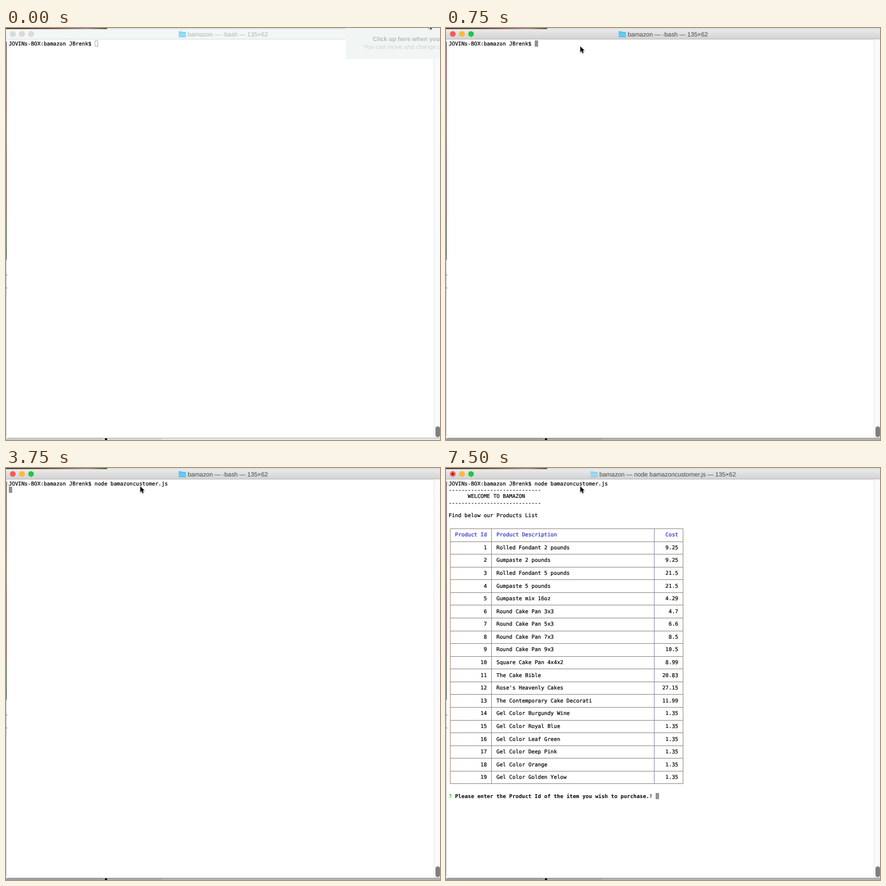
An HTML page with a canvas that plays this animation: 768x729 px, repeating every 8000 ms.

```html
<!DOCTYPE html>
<html lang="en">
<head>
<meta charset="utf-8">
<title>Terminal</title>
<style>
  html, body { margin: 0; width: 100%; height: 100%; overflow: hidden; background: #fff; }
  canvas { display: block; }
</style>
</head>
<body>
<canvas id="stage" width="768" height="729"></canvas>
<script>
const ctx = document.getElementById("stage").getContext("2d");
const W = 768, H = 729, LOOP = 8000;
const COL = 5.642, ROW = 11.29, LEFT = 4.7, BASE = 30.9;
const MONO = '9.37px "DejaVu Sans Mono", monospace';
const SANS = '10.85px "Liberation Sans", Arial, sans-serif';
const PROMPT = "JOVINs-BOX:bamazon JBrenk$ ";
const COMMAND = "node bamazoncustomer.js";

const PRODUCTS = [
  ["Rolled Fondant 2 pounds", "9.25"],
  ["Gumpaste 2 pounds", "9.25"],
  ["Rolled Fondant 5 pounds", "21.5"],
  ["Gumpaste 5 pounds", "21.5"],
  ["Gumpaste mix 16oz", "4.29"],
  ["Round Cake Pan 3x3", "4.7"],
  ["Round Cake Pan 5x3", "6.6"],
  ["Round Cake Pan 7x3", "8.5"],
  ["Round Cake Pan 9x3", "10.5"],
  ["Square Cake Pan 4x4x2", "8.99"],
  ["The Cake Bible", "20.83"],
  ["Rose's Heavenly Cakes", "27.15"],
  ["The Contemporary Cake Decorati", "11.99"],
  ...["Burgundy Wine", "Royal Blue", "Leaf Green", "Deep Pink", "Orange", "Golden Yelow"]
    .map(name => ["Gel Color " + name, "1.35"])
];

function rect(x, y, w, h, color) {
  ctx.fillStyle = color;
  ctx.fillRect(x, y, w, h);
}

function label(text, x, y, font, color) {
  ctx.font = font;
  ctx.fillStyle = color;
  ctx.fillText(text, x, y);
}

// Text on the terminal's character grid, with a hairline for weight
function print(text, col, row, color = "#000", bold = false) {
  const x = LEFT + col * COL, y = BASE + row * ROW;
  label(text, x, y, (bold ? "bold " : "") + MONO, color);
  if (bold) return;
  ctx.lineWidth = 0.22;
  ctx.strokeStyle = color;
  ctx.strokeText(text, x, y);
}

function printRight(text, endCol, row, color) {
  print(text, endCol - text.length, row, color);
}

function vertical(stops, h) {
  const g = ctx.createLinearGradient(0, 0, 0, h);
  stops.forEach(([at, color]) => g.addColorStop(at, color));
  return g;
}

function drawDesktop(active) {
  rect(0, 0, W, H, "#fff");
  const top = ctx.createLinearGradient(0, 0, 179, 0);
  ["#59382c", "#4c4a2a", "#6b4a3a", "#8a6a60", "#a98791", "#4b5a2c"]
    .forEach((c, i) => top.addColorStop(i / 5, c));
  rect(0, 0, 179, 2, top);
  rect(179, 0, W - 179, 2, "#dedede");
  rect(0, 726, 172, 3, "#e2e2e2");
  rect(172, 726, 103, 3, "#efefef");
  rect(0, 726, W, 3, active ? "rgba(0,0,0,.3)" : "rgba(0,0,0,.1)");
  rect(175, 726, 4, 3, "#111");
}

function drawFolder(x, color) {
  ctx.fillStyle = color;
  ctx.beginPath();
  ctx.roundRect(x, 5.5, 6, 4, 1);
  ctx.roundRect(x, 6.7, 13, 9.6, 1);
  ctx.fill();
  rect(x + 0.5, 8, 12, 0.8, "rgba(40,130,180,.28)");
  rect(x + 0.5, 15.4, 12, 0.8, "rgba(40,130,180,.35)");
}

function drawLights(active, running) {
  const colors = active ? ["#fc5650", "#fdbb37", "#1fc843"] : ["#d9dada", "#d9dada", "#d9dada"];
  colors.forEach((color, i) => {
    ctx.beginPath();
    ctx.arc(12 + 16.2 * i, 10.6, 4.9, 0, 7);
    ctx.fillStyle = color;
    ctx.fill();
    ctx.lineWidth = 0.5;
    ctx.strokeStyle = "rgba(0,0,0,.1)";
    ctx.stroke();
  });
  if (running) {
    ctx.beginPath();
    ctx.arc(12, 10.6, 1.7, 0, 7);
    ctx.fillStyle = "#5c0a08";
    ctx.fill();
  }
}

function drawWindow(active, running) {
  ctx.save();
  ctx.beginPath();
  ctx.roundRect(0, 2, W + 8, 724, 4);
  ctx.clip();
  rect(0, 2, W, 724, "#fff");
  rect(0, 2, W, 18, active ? vertical([[0, "#ededed"], [1, "#d2d2d2"]], 20) : "#f2f6f6");
  rect(0, 19.4, W, 0.9, active ? "#b4b4b4" : "#d8dbdb");
  rect(757, 20, 11, 705, active ? "#fafafa" : "#f9fbfb");
  rect(757, 20, 1, 705, active ? "#e2e2e2" : "#dfe5e5");
  rect(0, 725, W, 1, active ? "#a0a0a0" : "#b4b4b4");
  ctx.restore();

  rect(0, 24, 1, 386, vertical([
    [0, "#3a2c25"], [0.15, "#5a231f"], [0.35, "#5b2b20"], [0.46, "#504c28"],
    [0.54, "#532422"], [0.8, "#562423"], [0.87, "#284023"], [1, "#223822"]
  ], 410));
  rect(0, 410, 1, 312, "#c4c4c4");
  rect(0, 436, 1, 2, "#222");
  rect(0, 459, 1, 2, "#222");

  ctx.beginPath();
  ctx.roundRect(760, 705, 8, 19, 4);
  ctx.fillStyle = "#7f7f7f";
  ctx.fill();

  drawLights(active, running);
  drawFolder(running ? 255.5 : 305.5, running ? "#a2d8ee" : active ? "#62caf4" : "#94dcfa");
  label(`bamazon — ${running ? COMMAND : "-bash"} — 135×62`, running ? 271.5 : 321.5, 14.5,
    SANS, active ? "#474747" : "#b2b4b4");
}

function drawNotice() {
  rect(601, 0, 167, 55, "#f1f6f5");
  label("Click up here when you", 649, 22.5, "bold " + SANS.replace("10.85", "10.65"), "#b6b9b8");
  label("You can move and change t", 633, 36.5, SANS, "#cfd2d1");
}

function drawCaret(col, row, active) {
  const x = Math.round(LEFT + col * COL), y = Math.round(22 + row * ROW);
  if (active) {
    rect(x, y, 6, 11, "#929292");
  } else {
    ctx.lineWidth = 1;
    ctx.strokeStyle = "#b0b0b0";
    ctx.strokeRect(x + 0.5, y + 0.5, 5, 10);
  }
}

function drawPointer(x, y) {
  ctx.save();
  ctx.translate(x, y);
  ctx.scale(0.88, 0.88);
  ctx.shadowColor = "rgba(0,0,0,.35)";
  ctx.shadowBlur = 2;
  ctx.shadowOffsetY = 1;
  ctx.beginPath();
  [[0, 0], [0, 11.6], [2.6, 9.2], [4.5, 13.6], [6.7, 12.7], [4.9, 8.4], [8.4, 8.2]]
    .forEach(p => ctx.lineTo(...p));
  ctx.closePath();
  ctx.lineJoin = "round";
  ctx.lineWidth = 1.4;
  ctx.strokeStyle = "#fff";
  ctx.stroke();
  ctx.shadowColor = "transparent";
  ctx.fillStyle = "#000";
  ctx.fill();
  ctx.restore();
}

function drawTable() {
  const blue = "#2a2acb", top = 107, step = ROW * 2;
  for (let i = 0; i <= PRODUCTS.length + 1; i++) {
    rect(7, Math.round(top + i * step * 0.9995), 413, 1, "#8b8985");
  }
  [[7, "#a08f68"], [80, "#9f8580"], [368, "#8a8aa6"], [419, "#9c8c66"]]
    .forEach(([x, color]) => rect(x, top, 1, 452, color));
  print("Product Id", 2, 8, blue);
  print("Product Description", 15, 8, blue);
  printRight("Cost", 72, 8, blue);
  PRODUCTS.forEach(([name, cost], i) => {
    const row = 10 + 2 * i;
    printRight(String(i + 1), 12, row);
    print(name, 15, row);
    printRight(cost, 72, row);
  });
}

function drawListing(t) {
  const rule = "-".repeat(29), ask = "Please enter the Product Id of the item you wish to purchase.!";
  print(rule, 0, 1);
  print("WELCOME TO BAMAZON", 6, 2);
  print(rule, 0, 3);
  print("Find below our Products List", 0, 5);
  drawTable();
  print("?", 0, 49, t < 7500 ? "#4fae45" : "#2fb52f", true);
  print(ask, 2, 49, "#000", true);
  drawCaret(ask.length + 3, 49, true);
}

function draw(t) {
  const active = t >= 750, entered = t >= 3750, running = t >= 4000, listed = t >= 4250;
  const typed = t < 2000 ? "" : t < 2750 ? COMMAND.slice(0, 5) : COMMAND;
  drawDesktop(active);
  drawWindow(active, running);
  if (t >= 250 && !active) {
    rect(432, 20, 325, 35, "#fcfcfc");
    if (t >= 500) rect(432, 20, 14, 29, "#fff");
  }
  if (entered) print("[", -0.8, 0, "#b5b5b5");
  print(PROMPT + typed, 0, 0);
  if (listed) drawListing(t);
  else if (entered) drawCaret(0, 1, true);
  else drawCaret(PROMPT.length + typed.length, 0, active);
  if (t < 250) {
    drawNotice();
    drawPointer(747.5, -9.5);
  } else if (t < 500) {
    drawPointer(433, 27);
  } else {
    drawPointer(active ? 237.6 : 238.6, active ? 32.6 : 33.1);
  }
}

function tick() {
  draw(performance.now() % LOOP);
  requestAnimationFrame(tick);
}

ctx.textRendering = "geometricPrecision";
ctx.lineJoin = "round";
tick();
</script>
</body>
</html>
```
